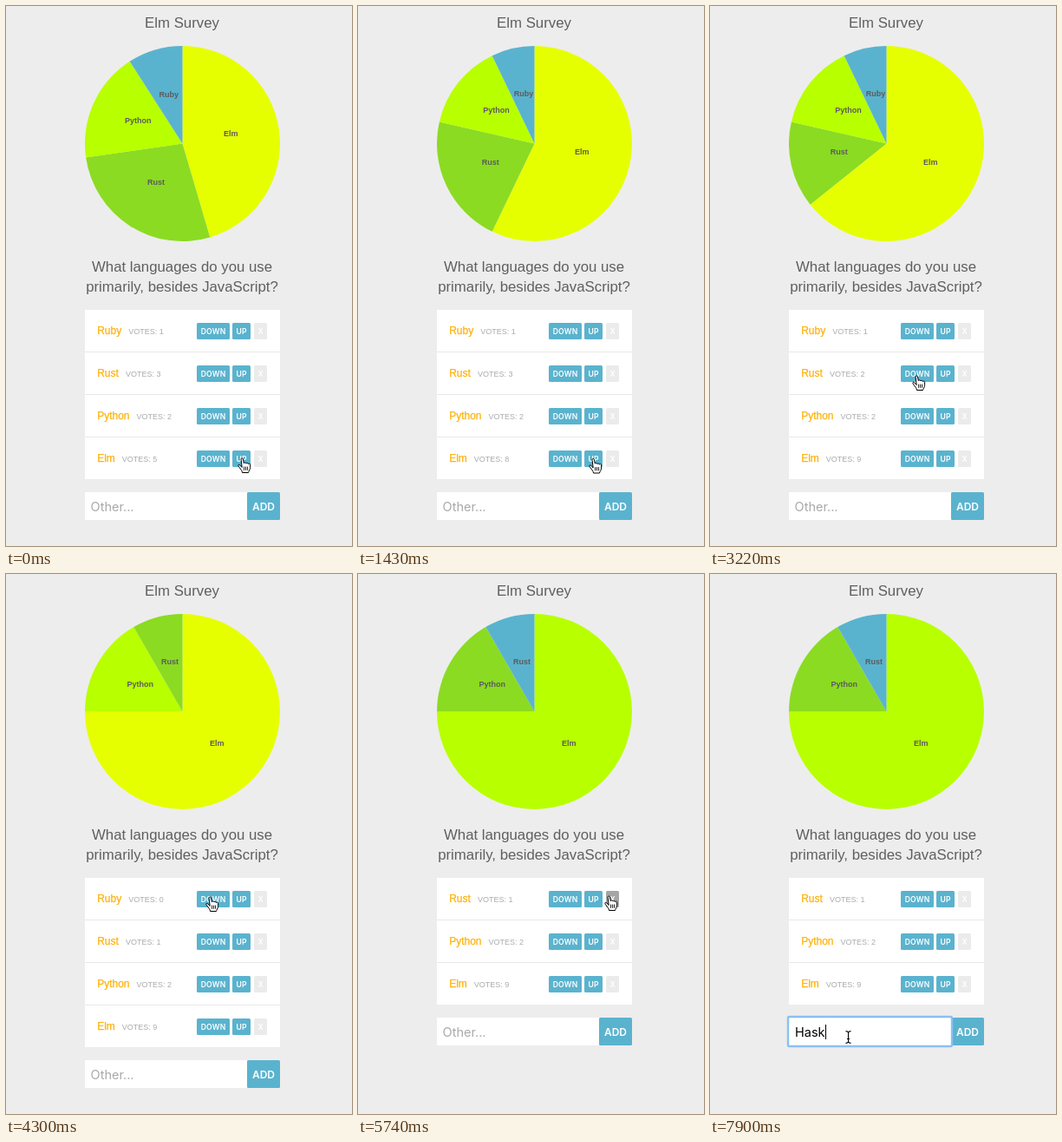
Recreate the animation shown at these times as an HTML page. Size 399 px wide and 622 px high, loop 8 s.

```html
<!DOCTYPE html>
<html lang="en">
<head>
<meta charset="utf-8">
<title>Elm Survey</title>
<style>
  html, body { margin: 0; width: 100%; height: 100%; overflow: hidden; background: #ededed; }
  svg { display: block; width: 100%; height: 100%; font-family: "Liberation Sans", Arial, sans-serif; }
  .heading { font-size: 16.8px; fill: #5f5f5f; text-anchor: middle; }
  .label { font-size: 9px; font-weight: 700; fill: #5c5c5c; text-anchor: middle; }
  .name { font-size: 12px; fill: #fdb10a; stroke: #fdb10a; stroke-width: .25px; }
  .votes { font-size: 9px; fill: #aaa; }
  .button { font: 600 8.6px Inter, sans-serif; letter-spacing: .2px; fill: #fff; text-anchor: middle; }
  .add { font-size: 12px; letter-spacing: 0; }
  .field { font: 14.5px Inter, sans-serif; fill: #000; }
  .placeholder { fill: #a9a9a9; }
</style>
</head>
<body>
<svg viewBox="0 0 399 622">
  <defs>
    <g id="hand" fill="#fff" stroke="#000" stroke-linejoin="round" stroke-linecap="round">
      <path d="M4.9 11.2L2.8 8.9C1.5 7.6 .2 8.8 1.1 10.1L4.4 14.6C5 15.6 5.5 16.3 5.5 17.5H12.5C12.5 16 14.6 14.5 14.6 11.5V8.2C14.6 6.7 12.6 6.7 12.4 7.7C12.2 6.1 10.2 6 9.9 7C9.6 5.6 7.6 5.7 7.3 6.6L6.4 2C6 .2 3.7 .6 4.1 2.5Z"/>
      <path d="M7.6 11v3.4M9.6 11v3.4M11.6 11v3.4" stroke-width=".9"/>
    </g>
    <path id="beam" d="M.5 .6Q3 .6 3.5 2Q4 .6 6.5 .6M3.5 2V13M.5 14.4Q3 14.4 3.5 13Q4 14.4 6.5 14.4M2 9.5h3" fill="none" stroke="#000" stroke-width="1.1"/>
  </defs>
  <text class="heading" x="203" y="25">Elm Survey</text>
  <text class="heading" x="203" y="306">What languages do you use</text>
  <text class="heading" x="203" y="329">primarily, besides JavaScript?</text>
  <g id="scene"></g>
</svg>
<script>
const LOOP = 8000;
const BLUE = '#5ab3ce';
const COLORS = [BLUE, '#8bdb22', '#b8ff00', '#e6ff00'];
const CENTER = { x: 203.5, y: 158.5 }, RADIUS = 112.5;
const scene = document.getElementById('scene');

// Each step changes part of the state and holds until the next one.
const steps = [
  [0, { Ruby: 1, Rust: 3, Python: 2, Elm: 5, pointer: [267, 520], text: '' }],
  [360, { pointer: [266, 520.5] }],
  [710, { Elm: 6 }],
  [1070, { Elm: 7 }],
  [1430, { Elm: 8 }],
  [1790, { Elm: 9 }],
  [2150, { pointer: [266, 514] }],
  [2510, { pointer: [261.5, 433] }],
  [2860, { pointer: [233, 425] }],
  [3220, { Rust: 2 }],
  [3580, { Rust: 1 }],
  [3940, { pointer: [230, 376] }],
  [4300, { Ruby: 0, pointer: [230, 371] }],
  [5020, { pointer: [283.5, 370.5] }],
  [5380, { pointer: [284, 370], hover: true }],
  [5740, { removed: true }],
  [6100, { pointer: [156, 526], hover: false, beam: true }],
  [6460, { focus: true, caret: true }],
  [6820, { caret: false }],
  [7180, { text: 'H', caret: true }],
  [7540, { text: 'Ha' }],
  [7900, { text: 'Hask' }]
];

const rect = (x, y, w, h, fill, r = 0) =>
  `<rect x="${x}" y="${y}" width="${w}" height="${h}" rx="${r}" fill="${fill}"/>`;
const text = (cls, x, y, content) => `<text class="${cls}" x="${x}" y="${y}">${content}</text>`;
const polar = (angle, r) => [CENTER.x + r * Math.sin(angle), CENTER.y - r * Math.cos(angle)];

function button(x, y, width, label, fill) {
  return rect(x, y + 15, width, 19, fill, 1.5) + text('button', x + width / 2 + .1, y + 27.7, label);
}

function pie(items) {
  const total = items.reduce((sum, item) => sum + item.votes, 0);
  let angle = 0, slices = '', labels = '';
  items.filter(item => item.votes).sort((a, b) => b.votes - a.votes).forEach(({ name, votes, color }) => {
    const sweep = votes / total * 2 * Math.PI;
    const start = polar(angle, RADIUS), end = polar(angle + sweep, RADIUS);
    slices += `<path fill="${color}" d="M${CENTER.x} ${CENTER.y}L${start}A${RADIUS} ${RADIUS} 0 ${+(sweep > Math.PI)} 1 ${end}Z"/>`;
    labels += text('label', ...polar(angle + sweep / 2, RADIUS / 2), name);
    angle += sweep;
  });
  return slices + labels;
}

function row({ name, votes }, i, hover) {
  const y = 350 + i * 49;
  return (i ? rect(91, y - 1, 225, 1, '#e8e8e8') : '') +
    `<text x="105.2" y="${y + 28}"><tspan class="name">${name}</tspan><tspan class="votes" dx="8">VOTES: ${votes}</tspan></text>` +
    button(220, y, 38, 'DOWN', BLUE) +
    button(261, y, 21, 'UP', BLUE) +
    button(286, y, 15, 'X', hover && !i ? '#a5a5a5' : '#ebebeb');
}

function form(state, y) {
  const ring = `<rect x="90" y="${y - 1}" width="189" height="34" rx="1.5" fill="none" stroke="#8bc0f4" stroke-width="2.4"/>`;
  return rect(91, y, 187, 32, '#fff') +
    rect(278, y, 38, 32, BLUE, 1.5) +
    text('button add', 297, y + 21.3, 'ADD') +
    (state.focus ? ring : '') +
    (state.text ? text('field', 98, y + 22, state.text) : text('field placeholder', 97.6, y + 22, 'Other...'));
}

function render(state) {
  const names = ['Ruby', 'Rust', 'Python', 'Elm'].slice(state.removed ? 1 : 0);
  const items = names.map((name, i) => ({ name, votes: state[name], color: COLORS[i] }));
  const height = items.length * 49 - 1, formY = 350 + height + 15;
  scene.innerHTML = pie(items) + rect(91, 350, 225, height, '#fff') +
    items.map((item, i) => row(item, i, state.hover)).join('') + form(state, formY);
  if (state.caret) {
    const width = state.text ? scene.querySelector('.field').getComputedTextLength() : 0;
    scene.innerHTML += rect(Math.round(98 + width), formY + 8, 1, 17, '#000');
  }
  scene.innerHTML += `<use href="#${state.beam ? 'beam' : 'hand'}" transform="translate(${state.pointer})"/>`;
}

let shown = 0;
function tick() {
  const time = performance.now() % LOOP;
  const past = steps.filter(([start]) => start <= time);
  if (past.length !== shown) {
    shown = past.length;
    render(Object.assign({}, ...past.map(step => step[1])));
  }
  requestAnimationFrame(tick);
}
tick();
</script>
</body>
</html>
```
